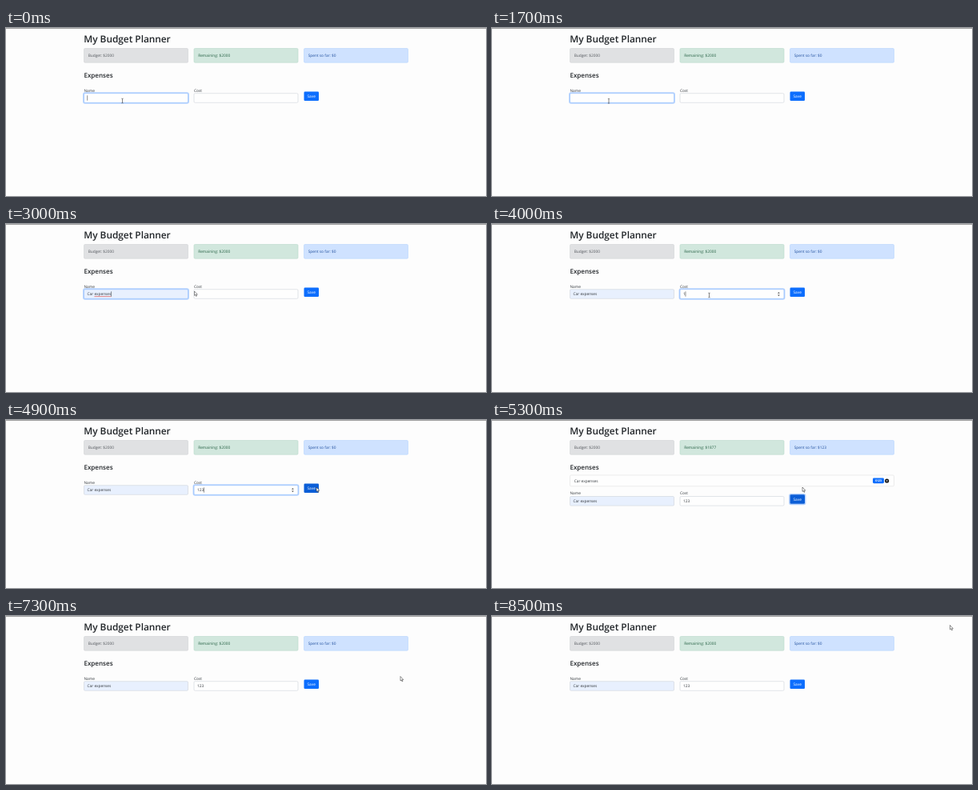
An HTML page that plays this animation: 600 by 210 pixels, repeating every 8600 ms.

```html
<!DOCTYPE html>
<html lang="en">
<head>
<meta charset="utf-8">
<title>Budget planner</title>
<style>
html, body { margin: 0; width: 100%; height: 100%; overflow: hidden; background: #fdfdfd; }
svg { display: block; width: 600px; height: 210px; }
text { font: 400 4.8px "Open Sans", "Noto Sans", sans-serif; fill: #33383d; text-rendering: geometricPrecision; white-space: pre; }
.h1 { font-size: 11.9px; font-weight: 600; fill: #212529; letter-spacing: -.04px; }
.h2 { font-size: 8.05px; font-weight: 600; fill: #212529; }
.box, .field { stroke-width: .6; }
.field { fill: #fefefe; stroke: #ced4da; }
.auto { fill: #e8f0fe; }
.ring { fill: none; stroke: #0d6efd; stroke-opacity: .3; stroke-width: 1.4; }
.focus .field { stroke: #86b7fe; }
.ring, .caret { visibility: hidden; }
.focus .ring { visibility: visible; }
.caret { stroke: #222; stroke-width: .5; }
.button { fill: #0d6efd; }
.hover .button { fill: #0b5ed7; }
.white { fill: #fff; }
.badge { font-size: 3.6px; font-weight: 700; fill: #fff; }
</style>
</head>
<body>
<svg viewBox="0 0 600 210">
  <rect width="600" height=".8" fill="#8a8a8a"/>
  <text class="h1" x="97.3" y="17.8">My Budget Planner</text>

  <g class="box">
    <rect x="97.5" y="25.5" width="130" height="17.7" rx="1.3" fill="#e0e1e3" stroke="#d0d2d5"/>
    <rect x="235" y="25.5" width="130" height="17.7" rx="1.3" fill="#d1e7dd" stroke="#badbcc"/>
    <rect x="372.5" y="25.5" width="130" height="17.7" rx="1.3" fill="#cfe2ff" stroke="#b6d4fe"/>
  </g>
  <text x="102.7" y="36.2" style="fill:#52575c">Budget: $2000</text>
  <text id="left" x="240.2" y="36.2" style="fill:#245f43"></text>
  <text id="spent" x="377.7" y="36.2" style="fill:#204f9c"></text>

  <text class="h2" x="97.4" y="62">Expenses</text>

  <g id="item">
    <rect class="box" x="97.5" y="69" width="405" height="13.8" rx="1.3" fill="#fefefe" stroke="#dfdfdf"/>
    <text x="102.7" y="77.7">Car expenses</text>
    <rect x="476" y="72.5" width="14" height="6.7" rx="1.4" fill="#0d6efd"/>
    <text class="badge" x="483" y="77.2" text-anchor="middle">$123</text>
    <circle cx="493.6" cy="76" r="2.6" fill="#111"/>
    <path d="M492.6 75l2 2m0-2l-2 2" stroke="#fff" stroke-width=".6"/>
  </g>

  <g id="form">
    <g id="name">
      <text x="97.5" y="79.7">Name</text>
      <rect class="ring" x="96.8" y="81" width="131.4" height="13" rx="2"/>
      <rect class="field" x="97.5" y="81.7" width="130" height="11.6" rx="1.3"/>
      <text class="value" x="101.5" y="89.3"></text>
      <path class="spell" stroke="#e0403c" stroke-width=".6"/>
      <path class="caret"/>
    </g>
    <g id="cost">
      <text x="235" y="79.7">Cost</text>
      <rect class="ring" x="234.3" y="81" width="131.4" height="13" rx="2"/>
      <rect class="field" x="235" y="81.7" width="130" height="11.6" rx="1.3"/>
      <text class="value" x="239" y="89.3"></text>
      <path class="spin" d="M357 86.8l1.4-1.8 1.4 1.8zm0 1.6l1.4 1.8 1.4-1.8z" fill="#555"/>
      <path class="caret"/>
    </g>
    <g id="save">
      <rect class="ring" x="371.8" y="78.8" width="19.9" height="12.9" rx="2"/>
      <rect class="button" x="372.5" y="79.5" width="18.5" height="11.5" rx="1.3"/>
      <text class="white" x="381.7" y="86.9" text-anchor="middle">Save</text>
    </g>
  </g>

  <path id="arrow" d="M0 0v5.4l1.2-1 .9 2 .9-.4-.9-1.9h1.7z" fill="#fff" stroke="#222" stroke-width=".5"/>
  <path id="beam" d="M-1.1-2.8h.8l.3.3.3-.3h.8M0-2.5v5M-1.1 2.8h.8l.3-.3.3.3h.8" fill="none" stroke="#333" stroke-width=".6"/>
</svg>
<script>
const LOOP = 8600, STEP = 100;
const FILL = 2500, COST = 3400, CLICK = 5000, SAVED = 5200, REMOVED = 6900;

// time, x, y of the mouse
const path = [
  [0, 145.5, 91], [400, 145.5, 91], [500, 146, 91.3], [2000, 146, 91.3],
  [2400, 150, 104], [2600, 150, 104], [3000, 235.5, 84], [3500, 271.5, 89],
  [4300, 271.5, 89], [4800, 388, 84], [5300, 388, 84], [5900, 493, 75.5],
  [7500, 493, 75.5], [7900, 580, 11.5], [8200, 580, 11.5], [8500, 572.5, 11.5]
];

const $ = s => document.querySelector(s);
const within = (t, a, b) => t >= a && t < b;
const show = (el, on) => { el.style.visibility = on ? 'visible' : 'hidden'; };
const ease = p => p * p * (3 - 2 * p);

function mouseAt(t) {
  const i = path.findIndex(k => k[0] > t);
  if (i < 0) return path[path.length - 1].slice(1);
  const [t0, x0, y0] = path[i - 1], [t1, x1, y1] = path[i];
  const p = ease((t - t0) / (t1 - t0));
  return [x0 + (x1 - x0) * p, y0 + (y1 - y0) * p];
}

function drawField(id, value, focused, caretOn) {
  const text = $(id + ' .value'), caret = $(id + ' .caret');
  text.textContent = value;
  $(id).classList.toggle('focus', focused);
  const x = +text.getAttribute('x') + (value ? text.getComputedTextLength() + .2 : .2);
  caret.setAttribute('d', `M${x} 84.3v6.4`);
  show(caret, focused && caretOn);
  return text;
}

function draw(t) {
  const saved = within(t, SAVED, REMOVED);
  $('#left').textContent = 'Remaining: $' + (saved ? 1877 : 2000);
  $('#spent').textContent = 'Spent so far: $' + (saved ? 123 : 0);
  show($('#item'), saved);
  $('#form').setAttribute('transform', `translate(0 ${saved ? 13.8 : 0})`);

  const filled = t >= FILL;
  const nameText = drawField('#name', filled ? 'Car expenses' : '', t < COST,
    t < 300 || within(t, 800, 1200) || t >= 1800);
  $('#name .field').classList.toggle('auto', filled);
  const spell = $('#name .spell');
  const checking = within(t, FILL, COST);
  show(spell, checking);
  if (checking) {
    const from = 101.5 + nameText.getSubStringLength(0, 4);
    spell.setAttribute('d', `M${from} 90.6H${101.5 + nameText.getComputedTextLength()}`);
  }

  const digits = t < 4000 ? 0 : t < 4100 ? 1 : t < 4300 ? 2 : 3;
  drawField('#cost', '123'.slice(0, digits), within(t, COST, CLICK), !within(t, 3900, 4000));
  show($('#cost .spin'), within(t, 3100, CLICK));

  $('#save').classList.toggle('focus', within(t, CLICK, REMOVED));
  $('#save').classList.toggle('hover', within(t, 4700, REMOVED));

  const [x, y] = mouseAt(t);
  const overField = !saved && y > 81.7 && y < 93.5 &&
    (within(x, 97.5, 227.5) || within(x, 236, 365));
  for (const id of ['#arrow', '#beam']) $(id).setAttribute('transform', `translate(${x} ${y})`);
  show($('#arrow'), !overField);
  show($('#beam'), overField);
}

const start = performance.now();
function tick() {
  const t = (performance.now() - start) % LOOP;
  draw(Math.floor(t / STEP) * STEP);
  requestAnimationFrame(tick);
}
tick();
</script>
</body>
</html>
```
